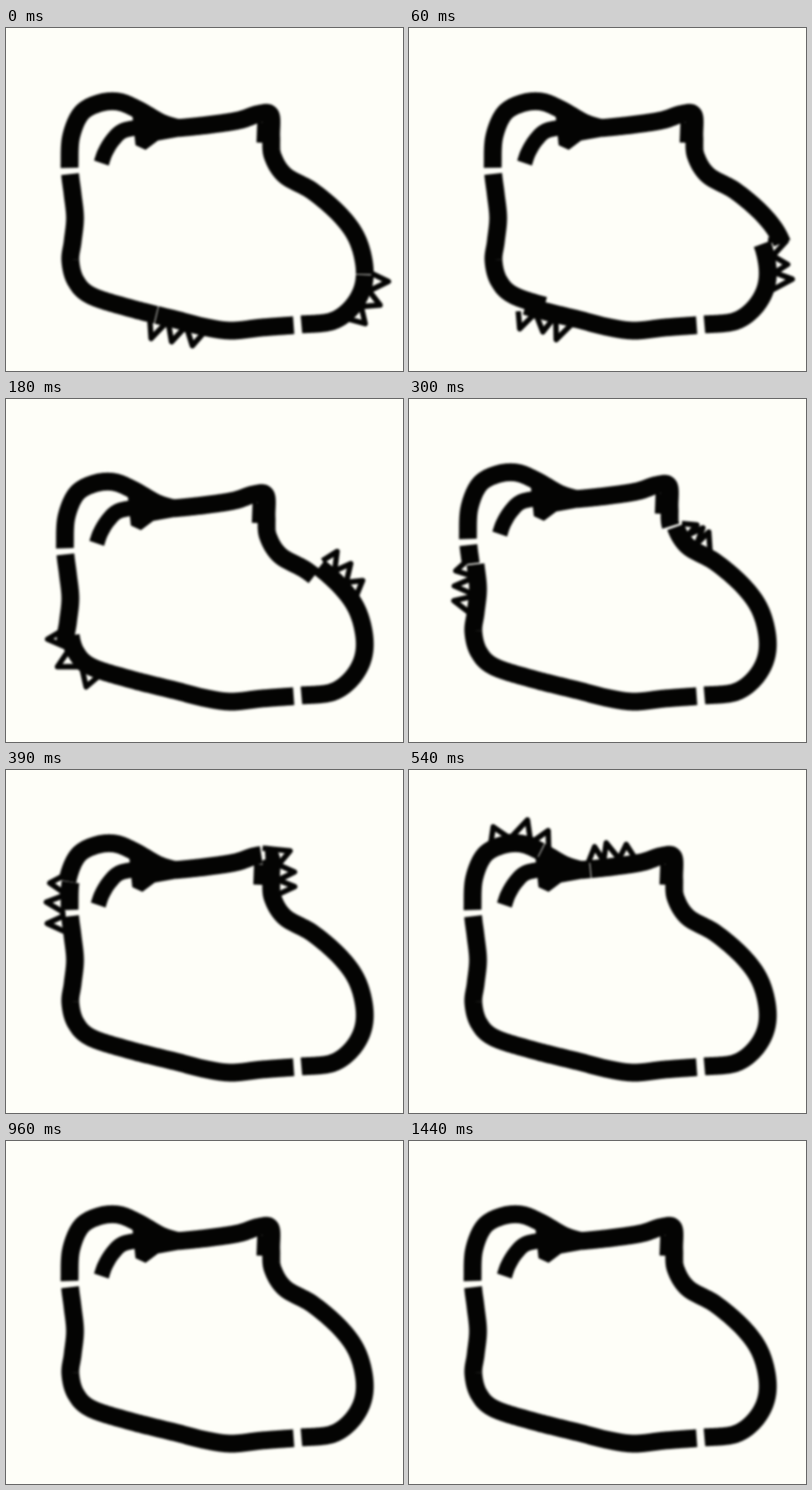
Animation, 512 px wide and 442 px high, one loop 1.5 s. Source, as an HTML page with a canvas:

```html
<!DOCTYPE html>
<html>
<head>
<meta charset="utf-8">
<style>
html, body { margin: 0; width: 100%; height: 100%; overflow: hidden; background: #fefef8; }
canvas { display: block; filter: blur(1.4px); }
</style>
</head>
<body>
<canvas id="stage" width="512" height="442"></canvas>
<script>
const ctx = document.getElementById('stage').getContext('2d');
const LOOP = 1500, STEP = 30, FRONT = 28;

// Catmull-Rom curve resampled so that the index is the arc length in pixels
function curve(flat) {
  const p = [];
  for (let i = 0; i < flat.length; i += 2) p.push([flat[i], flat[i + 1]]);
  const out = [p[0]];
  let last = p[0], travelled = 0;
  for (let i = 0; i < p.length - 1; i++) {
    const a = p[i - 1] || p[i], b = p[i], c = p[i + 1], d = p[i + 2] || c;
    for (let u = 0.005; u <= 1; u += 0.005) {
      const q = [0, 1].map(k => b[k] + 0.5 * u * (c[k] - a[k] +
        u * (2 * a[k] - 5 * b[k] + 4 * c[k] - d[k] + u * (3 * (b[k] - c[k]) + d[k] - a[k]))));
      travelled += Math.hypot(q[0] - last[0], q[1] - last[1]);
      last = q;
      if (travelled >= out.length) out.push(q);
    }
  }
  return out;
}

// Both halves start at the gap under the foot and meet at the top
const left = {
  pts: curve([371, 383, 330, 386, 290, 390, 255, 385, 220, 376, 160, 361, 110, 345, 90, 326, 83, 300,
    86, 275, 89, 245, 86, 215, 83, 192, 82, 175, 84, 140, 97, 110, 120, 97, 145, 95, 170, 105,
    200, 122, 222, 129]),
  dash: [435, 8, 900, 0], side: 1, start: 152, speed: 0.77
};
const right = {
  pts: curve([381, 382, 420, 378, 445, 361, 460, 335, 462, 305, 452, 270, 430, 240, 395, 210, 360, 190,
    344, 165, 342, 140, 341, 112, 325, 111, 300, 119, 260, 125, 222, 129]),
  dash: [], side: -1, start: 90, speed: 0.68
};
const cuff = curve([123, 174, 128, 160, 138, 144, 152, 132, 180, 127]);
const fold = [[163, 112], [205, 112], [226, 120], [224, 140], [196, 145], [180, 157], [167, 151]];
const heel = [[335, 122], [334, 148]];

// time, x and y of the shake of the part not yet passed
const shakeKeys = [[0, 0, 0], [60, 26, 0], [180, -6, 12], [300, -6, 0], [540, 0, 0], [LOOP, 0, 0]];

function shakeAt(t) {
  const i = shakeKeys.findIndex(k => k[0] > t);
  const a = shakeKeys[i - 1], b = shakeKeys[i];
  const u = (t - a[0]) / (b[0] - a[0]), e = u * u * (3 - 2 * u);
  return [a[1] + (b[1] - a[1]) * e, a[2] + (b[2] - a[2]) * e];
}

function stroke(pts, width, [dx, dy] = [0, 0]) {
  ctx.beginPath();
  pts.forEach(([x, y]) => ctx.lineTo(x + dx, y + dy));
  ctx.lineWidth = width;
  ctx.stroke();
}

function drawHalf({ pts, dash, side, start, speed }, t, shake) {
  const centre = start + speed * t;
  const cut = Math.min(pts.length, Math.round(centre + FRONT));
  ctx.setLineDash(dash);
  ctx.lineDashOffset = 0;
  stroke(pts.slice(0, cut), 23);
  ctx.lineDashOffset = cut;
  stroke(pts.slice(cut), 23, shake);
  ctx.setLineDash([]);

  const outside = (s, height) => {
    const i = Math.max(1, Math.min(pts.length - 2, Math.round(s)));
    const [ax, ay] = pts[i - 1], [bx, by] = pts[i + 1];
    const len = Math.hypot(bx - ax, by - ay) || 1;
    return [pts[i][0] + side * height * (by - ay) / len, pts[i][1] - side * height * (bx - ax) / len];
  };
  const spacing = side > 0 ? 25 : 20;
  const zigzag = [];
  for (let k = -1; k <= 1; k++) {
    const s = centre + k * spacing;
    if (s > pts.length) continue;
    const wobble = Math.sin(t * 0.7 + k * 2.4);
    zigzag.push(outside(s - 11, 9), outside(s + 3 * wobble, 29 + 3 * wobble), outside(s + 9, 9));
  }
  stroke(zigzag, 7);
}

function draw(now) {
  const t = Math.floor(now % LOOP / STEP) * STEP;
  const shake = shakeAt(t);
  ctx.fillStyle = '#fefef8';
  ctx.fillRect(0, 0, 512, 442);
  ctx.strokeStyle = ctx.fillStyle = '#040403';
  ctx.lineJoin = 'round';
  drawHalf(left, t, shake);
  drawHalf(right, t, shake);
  stroke(cuff, 20, shake);
  stroke(heel, 22, shake);
  ctx.beginPath();
  fold.forEach(([x, y]) => ctx.lineTo(x + shake[0], y + shake[1]));
  ctx.fill();
  requestAnimationFrame(() => draw(performance.now() - began));
}

const began = performance.now();
draw(0);
</script>
</body>
</html>
```
